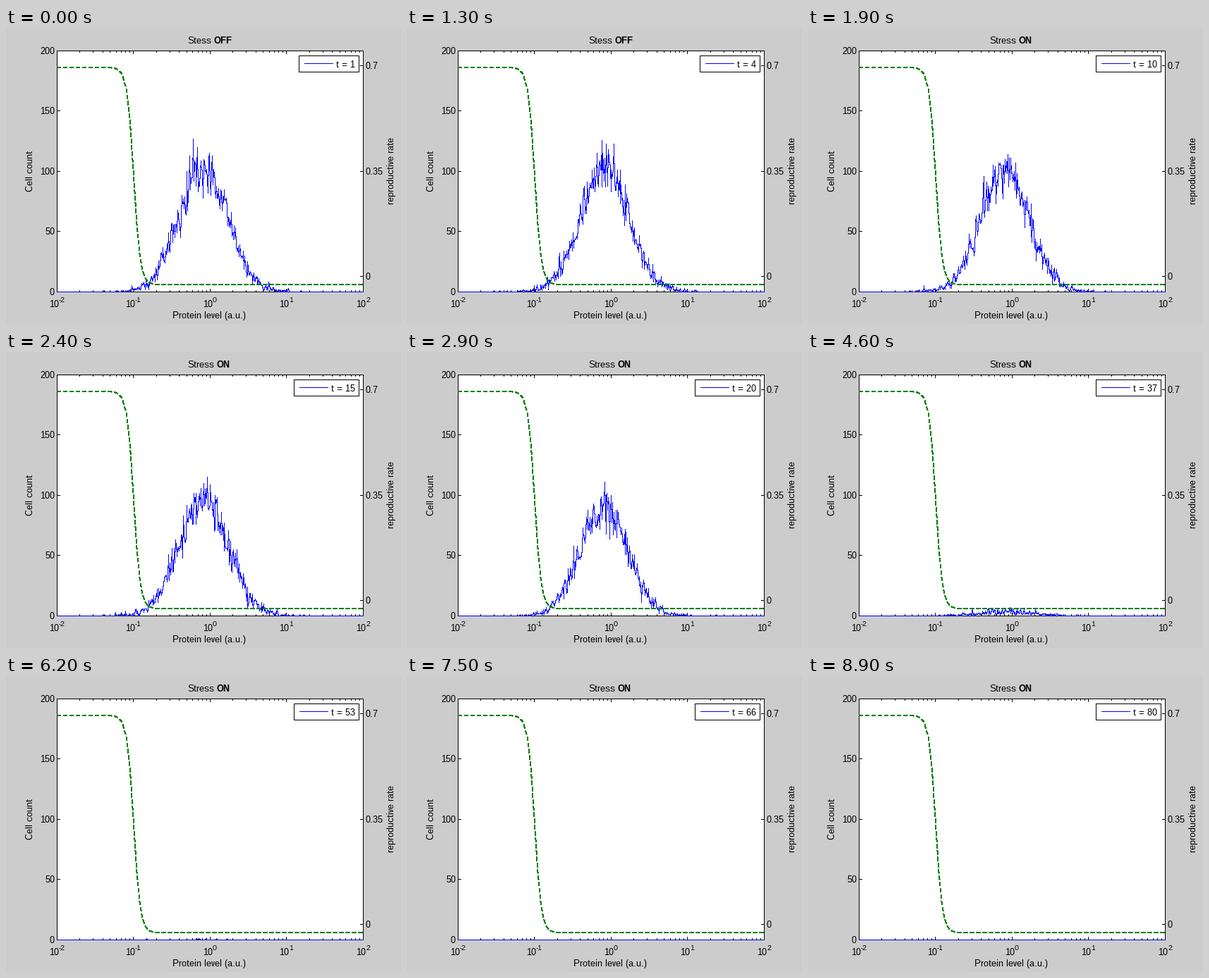
A matplotlib script that plays this animation: 560 px wide and 420 px high, repeating every 9 s.

```python
import numpy as np
import matplotlib.pyplot as plt
from matplotlib.animation import FuncAnimation
from matplotlib.patches import Rectangle

W, H, DPI = 560, 420, 100
PX = 72 / DPI                                  # one pixel in points
LEFT, RIGHT, TOP, BOTTOM = 72, 506, 32, 374
BLUE, GREEN = "#0000ff", "#007f00"
HOLD = 10                                      # extra frames spent on t = 1
STRESS_START = 10

plt.rcParams.update({
    "font.family": "Liberation Sans",
    "font.size": 13 * PX,
    "text.hinting": "native",
    "text.hinting_factor": 1,
    "lines.antialiased": False,
    "path.simplify": False,
})

fig = plt.figure(figsize=(W / DPI, H / DPI), dpi=DPI, facecolor="#cccccc")
ax = fig.add_axes([0, 0, 1, 1])
ax.set(xlim=(0, W), ylim=(H, 0))
ax.axis("off")


def x_px(log_level):
    return LEFT + (RIGHT - LEFT) * (log_level + 2) / 4


def y_px(count):
    return BOTTOM - (BOTTOM - TOP) * count / 200


def line(xs, ys, color="black", **kw):
    return ax.plot(xs, ys, color=color, lw=PX, solid_capstyle="butt",
                   solid_joinstyle="bevel", **kw)[0]


def label(x, y, s, ha="left", va="baseline", **kw):
    return ax.text(x, y, s, ha=ha, va=va, **kw)


def box(x0, y0, x1, y1, **kw):
    patch = Rectangle((x0, y0), x1 - x0, y1 - y0, facecolor="white",
                      edgecolor="black", lw=PX, antialiased=False, **kw)
    return ax.add_patch(patch)


# Plot frame and ticks
box(LEFT, TOP, RIGHT, BOTTOM, zorder=1)

for decade in range(-2, 3):
    for m in range(1, 10 if decade < 2 else 2):
        x = np.floor(x_px(decade + np.log10(m)))
        size = 4 if m == 1 else 2
        line([x, x], [BOTTOM, BOTTOM - size], zorder=2)
        line([x, x], [TOP, TOP + size], zorder=2)
    x = np.floor(x_px(decade)) - (11 if decade < 0 else 10)
    label(x, 396, "10")
    label(x + 14, 389, str(decade), fontsize=10 * PX)

for count in range(0, 201, 50):
    y = np.floor(y_px(count))
    line([LEFT, LEFT + 4], [y, y], zorder=2)
    label(69, y + 5, str(count), ha="right")

for y, rate in ((53, "0.7"), (203, "0.35"), (352, "0")):
    line([RIGHT - 4, RIGHT], [y, y], zorder=2)
    label(510, y + 5, rate)

label(288, 412, "Protein level (a.u.)", ha="center")
label(41, 203, "Cell count", ha="right", va="center", rotation=90)
label(553, 203, "reproductive rate", ha="right", va="center", rotation=90)

# Reproductive rate: a Hill curve, sampled evenly in level.
# Centred on a pixel edge, the thin aliased line fills two pixels.
levels = np.append(np.arange(1, 101) / 100, 100)
hill = 1 / (1 + (levels / 0.1) ** 10)
line(x_px(np.log10(levels)) + 0.5, 364 - 308 * hill, GREEN, zorder=4,
     snap=False, dashes=(5.2, 3.2), dash_capstyle="butt")

# Cell histogram
bins = np.linspace(-2, 2, 500)
z = (bins + 0.09) / 0.315
shape = 0.98 * np.exp(-z ** 2 / 2) + 0.02 * np.exp(-z ** 2 / 4)

PEAK_T = [1, 10, 15, 20, 25, 29, 33, 37, 45, 53, 60]
PEAK = [104, 103, 99, 89, 66, 40, 15, 3.6, 0.5, 0.06, 0.006]


def counts(t):
    if t > 60:
        return np.zeros_like(bins)
    peak = np.exp(np.interp(t, PEAK_T, np.log(PEAK)))
    return np.random.default_rng(100 + t).poisson(peak * shape)


def pixel_steps(y):
    """Each bin as one upright run, meeting its neighbours halfway."""
    mid = (y[1:] + y[:-1]) / 2
    before = np.append(y[0], mid)
    after = np.append(mid, y[-1])
    return np.column_stack([before, y, after]).ravel()


cells = line(np.repeat(np.round(x_px(bins)), 3), pixel_steps(y_px(0 * bins)),
             BLUE, zorder=3, snap=True)

# Title and legend
title = label(257, 22, "")
state = label(0, 22, "", weight="bold")
frame = box(408, 39, 500, 62, zorder=5)
key = line([416, 456], [50, 50], BLUE, zorder=6)
time_text = label(461, 56, "", zorder=6)


def draw(i):
    t = max(1, i - HOLD + 1)
    cells.set_ydata(pixel_steps(y_px(counts(t))))

    stressed = t >= STRESS_START
    title.set_text("Stress" if stressed else "Stess")
    state.set_text("ON" if stressed else "OFF")
    state.set_x(298 if stressed else 294)

    shift = 7 if t < 10 else 0
    frame.set_x(408 + shift)
    frame.set_width(92 - shift)
    key.set_xdata([416 + shift, 456 + shift])
    time_text.set_x(461 + shift)
    time_text.set_text(f"t = {t}")
    return cells, title, state, frame, key, time_text


anim = FuncAnimation(fig, draw, frames=90, interval=100, repeat=True)
plt.show()
```
